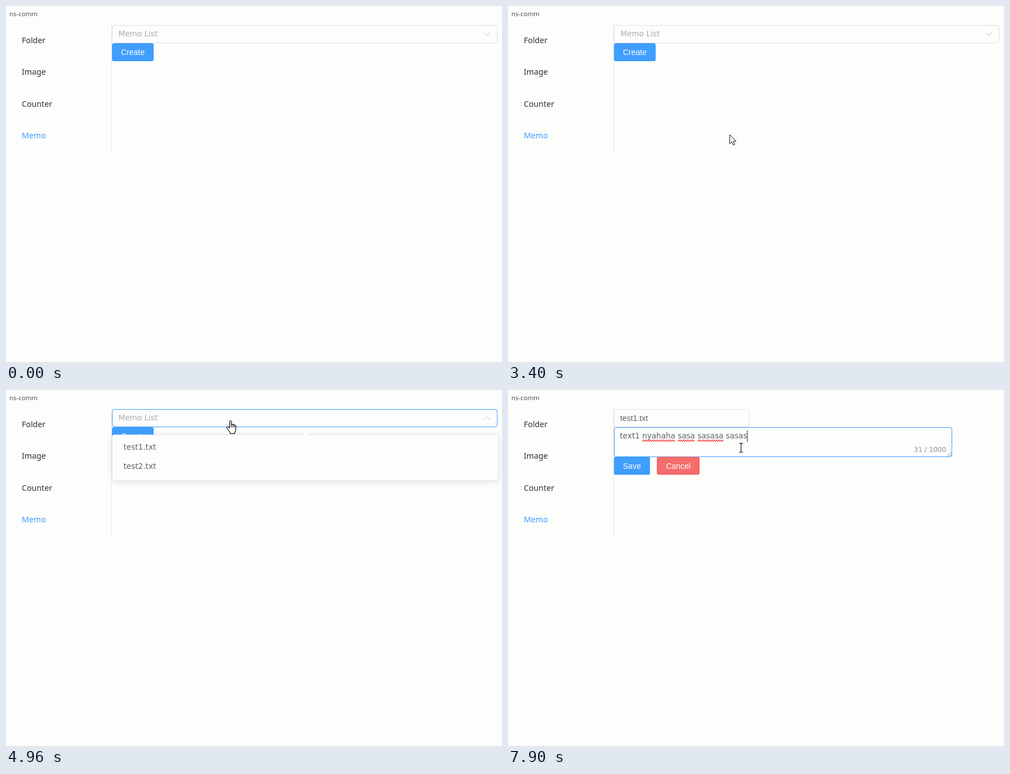
An HTML page that plays this animation: 880x632 px, repeating every 8 s.

```html
<!DOCTYPE html>
<html lang="en">
<head>
<meta charset="utf-8">
<title>Memo</title>
<style>
  html, body { margin: 0; width: 100%; height: 100%; overflow: hidden; background: #fdfdfc; }
  svg { display: block; width: 880px; height: 632px; }
  text { font: 13.6px "DejaVu Sans", sans-serif; fill: #606266; white-space: pre; }
  .title { font: 11.5px "Open Sans", sans-serif; fill: #4a4446; }
  .nav { font: 14.2px "Noto Sans", sans-serif; fill: #303133; }
  .active { fill: #409eff; }
  .button { font: 14px "Liberation Sans", Arial, sans-serif; fill: #fff; text-anchor: middle; }
  .name { font: 14px "Liberation Sans", Arial, sans-serif; }
  .hint { fill: #a8abb2; }
  .count { font-size: 12px; fill: #909399; }
  .box { fill: #fdfdfc; stroke: #dcdfe6; }
  .panel { fill: #fdfdfc; stroke: #e4e7ed; }
  .line { fill: none; stroke: #b4b8c0; }
  .pointer { fill: #fff; stroke: #111; stroke-linejoin: round; }
</style>
</head>
<body>
<svg viewBox="0 0 880 632">
  <defs>
    <filter id="shadow" x="-5%" y="-30%" width="110%" height="160%">
      <feDropShadow dx="0" dy="2" stdDeviation="6" flood-color="#000" flood-opacity=".1"/>
    </filter>
  </defs>
  <rect width="880" height="632" fill="#fdfdfc"/>
  <text class="title" x="6" y="18">ns-comm</text>
  <g id="nav"></g>
  <path d="M187.5 34V259" stroke="#e6e6ec"/>

  <g id="list">
    <rect id="select" class="box" x="188.5" y="34.5" width="683" height="31" rx="3.5"/>
    <text class="hint" x="199.5" y="54">Memo List</text>
    <path id="chevron" class="line" d="M-5 -2.5L0 2.5L5 -2.5"/>
    <g data-button="Create" data-x="188" data-y="66" data-w="74" data-fill="#409eff"></g>
    <g id="menu">
      <rect class="panel" filter="url(#shadow)" x="188.5" y="79.5" width="685" height="81" rx="3.5"/>
      <path class="panel" d="M524.5 79.5L530.5 73.5L536.5 79.5" stroke-width=".6"/>
      <path d="M525 80.5L530.5 74.5L536 80.5Z" fill="#fdfdfc"/>
      <rect id="hover" x="189" y="85" width="684" height="34" fill="#f5f7fa"/>
      <text x="208.5" y="106">test1.txt</text>
      <text x="208.5" y="140">test2.txt</text>
    </g>
  </g>

  <g id="form">
    <rect class="box" x="188.5" y="34.5" width="239" height="31" rx="3.5"/>
    <text class="name" x="199" y="55">test1.txt</text>
    <rect id="area" class="box" x="188.5" y="66.5" width="599" height="52" rx="3.5"/>
    <path class="line" style="stroke:#85858a" d="M779 118L788 109M784 118L788 114"/>
    <text id="memo" x="198.5" y="86" style="font-size:13.55px"></text>
    <path id="wave" fill="none" stroke="#f03a3a" stroke-width="1.2"/>
    <path id="caret" stroke="#303133"/>
    <text id="count" class="count" x="720" y="110"></text>
    <g data-button="Save" data-x="188" data-y="118.5" data-w="64" data-fill="#409eff"></g>
    <g data-button="Cancel" data-x="264" data-y="118.5" data-w="76" data-fill="#f56c6c"></g>
  </g>

  <path id="arrow" class="pointer" d="M.5 .5V16.5L4 13L6.8 19L9.2 18L6.6 12H11.7Z"/>
  <path id="hand" class="pointer" stroke-width="1.2" d="M-.8 13V2Q-.8 .5 .7 .5T2.2 2V8Q2.2 6.7 3.7 6.7T5.2 8Q5.2 7.2 6.7 7.2T8 9Q10.2 8.6 10.2 11V16Q10.2 19 8.4 21V23.4H.2V21.5L-5 14.5Q-6.6 11.6 -4.6 11Q-3 10.8 -.8 13.8M2.2 8V12.5M5.2 8V12.5M8 9V12.5"/>
  <path id="beam" fill="none" stroke="#111" stroke-width="1.2" d="M-3.5 -8H-1L0 -7L1 -8H3.5M0 -7V7M-3.5 8H-1L0 7L1 8H3.5"/>
</svg>
<script>
const LOOP = 8000;
const BASE = 'text1 nyahaha sasa sasasa';
const TYPED = ' sasas';
const KEYS = [7300, 7560, 7595, 7630, 7800, 7900];
const OPEN = 4000, PICK = 5700, FOCUS = 6800, CHECK = 7400;

const ui = {};
document.querySelectorAll('[id]').forEach(el => ui[el.id] = el);

const span = (t, a, b) => Math.min(1, Math.max(0, (t - a) / (b - a)));
const lerp = (a, b, k) => a + (b - a) * k;
const inOut = k => k * k * (3 - 2 * k);
const out = k => 1 - (1 - k) ** 3;
const show = (el, on) => el.setAttribute('display', on ? 'inline' : 'none');
const place = (el, x, y, extra = '') => el.setAttribute('transform', `translate(${x} ${y}) ${extra}`);
const mix = (a, b, k) => `rgb(${a.map((v, i) => Math.round(lerp(v, b[i], k)))})`;

const PALE = [220, 223, 230], GREY = [186, 190, 200], BLUE = [64, 158, 255];

ui.nav.innerHTML = ['Folder', 'Image', 'Counter', 'Memo'].map((s, i) =>
  `<text class="nav${i === 3 ? ' active' : ''}" x="28" y="${Math.round(66 + 56.3 * i)}">${s}</text>`).join('');

document.querySelectorAll('[data-button]').forEach(g => {
  const { button, x, y, w, fill } = g.dataset;
  g.innerHTML = `<rect x="${x}" y="${y}" width="${w}" height="32" rx="3.5" fill="${fill}"/>
    <text class="button" x="${+x + w / 2}" y="${+y + 21}">${button}</text>`;
});

// Zigzag under each unknown word, measured from the text itself
function squiggles() {
  const left = 198.5;
  return [...BASE.matchAll(/\b(nyahaha|sasa|sasasa)\b/g)].map(m => {
    const x = left + ui.memo.getSubStringLength(0, m.index);
    const w = ui.memo.getSubStringLength(m.index, m[0].length);
    let d = `M${x} 91.5`;
    for (let i = 2; i <= w; i += 2) d += `L${x + i} ${i % 4 ? 88.5 : 91.5}`;
    return d;
  }).join('');
}

function drawList(t) {
  const hover = span(t, 3750, 3900), focus = span(t, OPEN, OPEN + 200);
  ui.select.style.stroke = focus ? mix(GREY, BLUE, focus) : mix(PALE, GREY, hover);
  const k = out(span(t, OPEN, OPEN + 260));
  place(ui.chevron, 853, 50, `rotate(${-180 * k})`);
  show(ui.menu, k > 0);
  ui.menu.setAttribute('opacity', k);
  place(ui.menu, 0, 73 * (1 - k), `scale(1 ${k})`);
  show(ui.hover, t >= 5500);
}

function drawForm(t) {
  const n = KEYS.filter(k => t >= k).length;
  ui.memo.textContent = BASE + TYPED.slice(0, n);
  ui.count.textContent = `${BASE.length + n} / 1000`;
  ui.area.style.stroke = mix(PALE, BLUE, span(t, FOCUS, FOCUS + 200));
  const x = Math.floor(198.5 + ui.memo.getComputedTextLength()) + .5;
  ui.caret.setAttribute('d', `M${x} 72V92`);
  show(ui.caret, t >= FOCUS);
  show(ui.wave, t >= CHECK);
  if (t >= CHECK) ui.wave.setAttribute('d', squiggles());
}

function drawPointer(t) {
  const up = inOut(span(t, 3400, 3880));
  const x = lerp(393, 397, up), y = lerp(228, 54, up);
  const overSelect = y < 66;
  show(ui.arrow, t >= 2900 && !overSelect);
  place(ui.arrow, x, y);

  const down = span(t, 5470, 5530);
  show(ui.hand, overSelect && t < PICK);
  place(ui.hand, lerp(397.5, 383.5, down), lerp(54, 101, down));

  const drift = span(t, FOCUS, 7000);
  show(ui.beam, t >= PICK);
  if (t < 6560) place(ui.beam, 383.5, 109.5);
  else place(ui.beam, lerp(409.5, 413.5, drift), 102.5);
}

function draw(t) {
  const editing = t >= PICK;
  show(ui.list, !editing);
  show(ui.form, editing);
  if (editing) drawForm(t); else drawList(t);
  drawPointer(t);
}

const start = performance.now();
function tick() {
  draw((performance.now() - start) % LOOP);
  requestAnimationFrame(tick);
}
tick();
</script>
</body>
</html>
```
